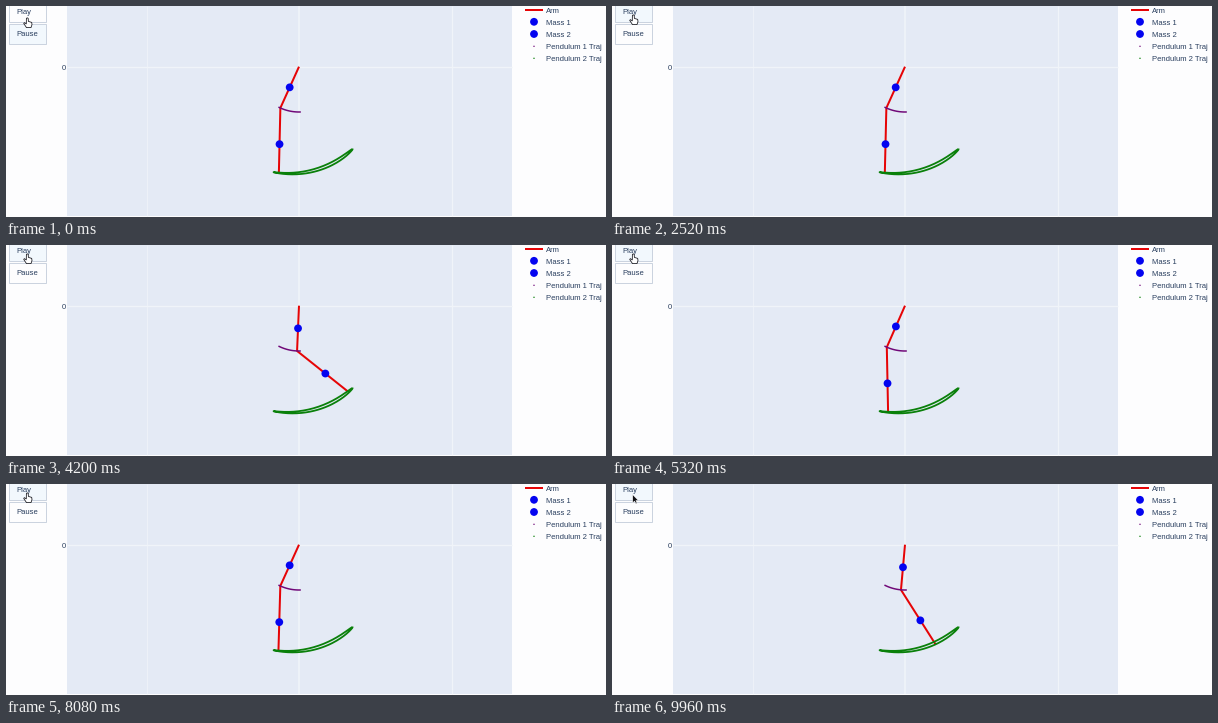
A matplotlib script that plays this animation: 600 by 211 pixels, repeating every 10 s.

```python
import matplotlib.pyplot as plt
import numpy as np
from matplotlib.animation import FuncAnimation
from matplotlib.patches import Circle, Polygon, Rectangle

W, H, DPI = 600, 211, 100
FRAMES, STEP = 250, 40
PX = 72 / DPI
INK, RED, BLUE = "#2a3f5f", "#e60406", "#0404f0"
GREEN, PURPLE = "#0a800a", "#700878"
HOVER, PLAIN, EDGE = "#f2f8fd", "#fdfdfe", "#cbd3df"
AREA, GRID = "#e4eaf5", "#f0f4f9"
PIVOT = np.array([293.0, 60.7])
L1, L2 = 45.3, 64.6
COM1, COM2 = 0.5, 0.56

# times in ms at which the swing turns, right and left in alternation
TURNS = [-1150, 250, 1550, 2730, 3920, 5720, 6560, 8396, 11077]


def phase(t):
    return np.interp(t, TURNS, np.pi * np.arange(len(TURNS)))


def polar(length, degrees):
    a = np.radians(degrees)
    return length * np.array([np.sin(a), np.cos(a)])


def swing(p):
    """Upper and lower arm vectors; the upper arm leads by 16 degrees."""
    upper = polar(L1, -11.8 + 13 * np.cos(p + np.radians(16)))
    lower = polar(L2, 24.5 + 30.5 * np.cos(p))
    return upper, lower


plt.rcParams["toolbar"] = "None"
plt.rcParams["font.family"] = "Liberation Sans"
fig = plt.figure(figsize=(W / DPI, H / DPI), dpi=DPI, facecolor=PLAIN)
ax = fig.add_axes([0, 0, 1, 1])
ax.set_xlim(0, W)
ax.set_ylim(H, 0)
ax.axis("off")


def line(xs, ys, color, width, z=2):
    return ax.plot(xs, ys, color=color, lw=width * PX, zorder=z,
                   solid_capstyle="butt", solid_joinstyle="round")[0]


def disc(x, y, color=BLUE, r=3.9):
    return ax.add_patch(Circle((x, y), r, fc=color, ec="none", zorder=5))


def box(x, y, w, h, fill, edge="none", z=0):
    return ax.add_patch(Rectangle((x, y), w, h, fc=fill, ec=edge, lw=PX, zorder=z))


def label(x, y, text, ha="left"):
    ax.text(x, y + 2.7, text, size=7.7 * PX, color=INK, ha=ha,
            va="baseline", zorder=8)


# plot area and grid
box(61, -2, 445, 211.6, AREA)
for x, width in ((140.5, 0.8), (293, 1.6), (446, 1.2)):
    line([x, x], [0, 209.6], GRID, width, 1)
line([61, 506], [60.5] * 2, GRID, 1.4, 1)
label(58.3, 61, "0", "center")

# traced paths
arc = PIVOT[:, None] + polar(L1, np.linspace(-27, 2.3, 40))
line(*arc, PURPLE, 1.5, 6)
loop = PIVOT[:, None] + sum(swing(np.linspace(0, 2 * np.pi, 200)))
line(*loop, GREEN, 1.8, 6)

# legend
line([518.5, 537], [3.6] * 2, RED, 2)
disc(528, 15.8)
disc(528, 28)
disc(528, 40.3, PURPLE, 0.7)
disc(528, 52.3, GREEN, 0.7)
names = ["Arm", "Mass 1", "Mass 2", "Pendulum 1 Traj", "Pendulum 2 Traj"]
for i, name in enumerate(names):
    label(540, 3.9 + 12.1 * i, name)

# buttons
play = box(2.5, -5.5, 37, 21, PLAIN, EDGE, 7)
pause = box(2.5, 17.5, 37, 20, PLAIN, EDGE, 7)
label(10, 5, "Play")
label(10, 27.5, "Pause")

# mouse pointers, relative to the fingertip or arrow tip
HAND = np.array([(-.9, .4), (0, -.2), (.9, .4), (1.1, 3.4), (4.4, 4.4),
                 (4.7, 6.6), (3.7, 9.6), (-.8, 9.6), (-3.6, 5.4),
                 (-2.9, 4.6), (-1, 6)])
ARROW = np.array([(0, 0), (0, 8.2), (1.9, 6.5), (3.2, 9.2), (4.4, 8.6),
                  (3.2, 6), (5.6, 5.8)])
hand = ax.add_patch(Polygon(HAND, fc="white", ec="#1c1c22", lw=.8 * PX, zorder=10))
arrow = ax.add_patch(Polygon(ARROW + (20.7, 10.6), fc="#101014", ec="white",
                             lw=.5 * PX, zorder=10))

# pendulum
arm = line([], [], RED, 2, 4)
mass1, mass2 = disc(*PIVOT), disc(*PIVOT)


def draw(n):
    t = n * STEP
    upper, lower = swing(phase(t))
    elbow = PIVOT + upper
    arm.set_data(*np.array([PIVOT, elbow, elbow + lower]).T)
    mass1.center = PIVOT + COM1 * upper
    mass2.center = elbow + COM2 * lower

    on_play = t >= 120
    play.set_facecolor(HOVER if on_play else PLAIN)
    pause.set_facecolor(PLAIN if on_play else HOVER)
    hand.set_xy(HAND + (21.3, 12 - 3 * min(t / 240, 1)))
    leaving = t >= 9920
    hand.set_visible(not leaving)
    arrow.set_visible(leaving)
    return arm, mass1, mass2, play, pause, hand, arrow


anim = FuncAnimation(fig, draw, frames=FRAMES, interval=STEP, repeat=True,
                     repeat_delay=0, blit=False)
plt.show()
```
